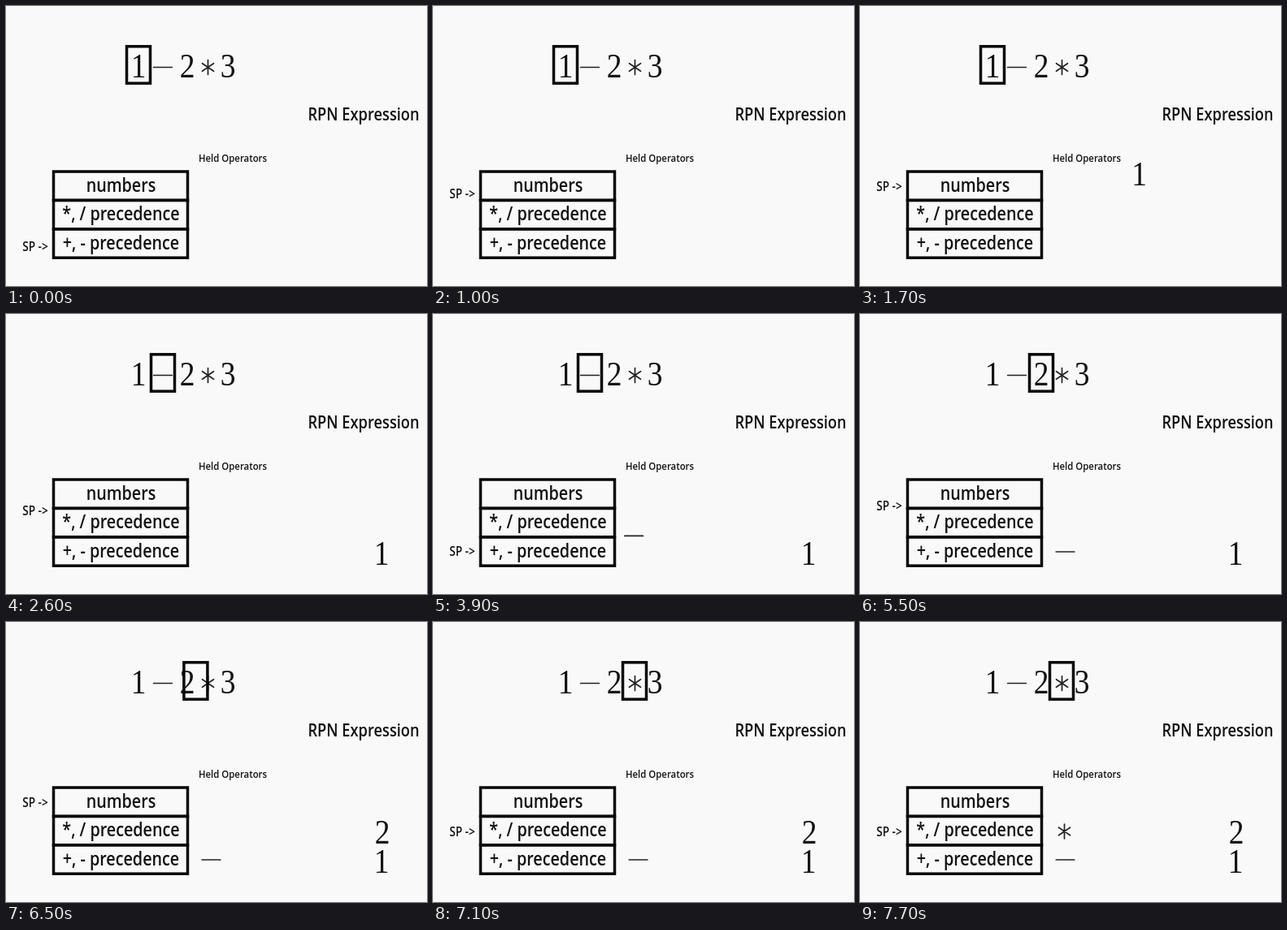
Recreate the animation shown at these times as an HTML page. Size 518 px wide and 345 px high, loop 8 s.

```html
<!DOCTYPE html>
<html lang="en">
<head>
<meta charset="utf-8">
<title>Expression to RPN</title>
<style>
  html, body { margin: 0; width: 100%; height: 100%; overflow: hidden; background: #f9f9f9; }
  svg { display: block; width: 518px; height: 345px; }
  text { font-family: "Open Sans", "Noto Sans", sans-serif; font-weight: 600; text-anchor: middle; fill: #111; }
  .digit { font-family: "Liberation Serif", serif; font-weight: 400; font-size: 43px; }
  .frame { fill: none; stroke: #080808; stroke-width: 3.5; }
  .sign { fill: none; stroke: #222; stroke-width: 1.7; stroke-linecap: round; }
</style>
</head>
<body>
<svg id="stage" viewBox="0 0 518 345"></svg>
<script>
const LOOP = 8000;
const SQUEEZE = 0.87; // the whole scene is narrower than its natural aspect
const stage = document.getElementById('stage');

function add(parent, tag, attrs, content = '') {
  const node = document.createElementNS('http://www.w3.org/2000/svg', tag);
  for (const key in attrs) node.setAttribute(key, attrs[key]);
  node.textContent = content;
  return parent.appendChild(node);
}

const place = (node, x, y) => node.setAttribute('transform', `translate(${x} ${y})`);

function group(x, y) {
  const node = add(stage, 'g', {});
  place(node, x, y);
  return node;
}

function label(content, x, y, size) {
  const node = group(x, y);
  add(node, 'text', { transform: `scale(${SQUEEZE} 1)`, 'font-size': size }, content);
  return node;
}

function digit(content, x, y) {
  const node = group(x, y);
  add(node, 'text', { class: 'digit', transform: `scale(${SQUEEZE} 1)`, y: 14.5 }, content);
  return node;
}

function minus(x, y) {
  const node = group(x, y);
  add(node, 'path', { class: 'sign', d: 'M-11.3 0H11.3' });
  return node;
}

function star(x, y) {
  const node = group(x, y);
  add(node, 'path', { class: 'sign', 'stroke-width': 2, d: 'M0 -9V9M-7 -4.8L7 4.8M-7 4.8L7 -4.8' });
  return node;
}

// Static scene
label('RPN Expression', 440, 140.5, 21);
label('Held Operators', 279, 191.5, 13.1);
['numbers', '*, / precedence', '+, - precedence'].forEach((name, row) => {
  const top = 204 + row * 35.4;
  add(stage, 'rect', { class: 'frame', x: 58.5, y: top, width: 165, height: 35.4 });
  label(name, 141.5, top + 25, 22.7);
});
digit('1', 163, 73.5);
minus(193, 75.5);
digit('2', 223, 73.5);
star(248.5, 75.5);
digit('3', 273, 73.5);

// Moving parts
const pointer = label('SP ->', 36, 302, 15.6);
const cursor = group(163, 72.5);
add(cursor, 'rect', { class: 'frame', x: -14.5, y: -22.7, width: 29, height: 45.4 });

const STEP = 280, SHIFT = 300, COPY = 360;
const NUMBERS = [36, 228], TIMES = [36, 264], PLUS = [36, 298];

// Each move: [middle time, duration, destination]
const parts = [
  { node: pointer, from: [36, 302], moves: [
    [250, STEP, TIMES], [970, STEP, NUMBERS], [2594, STEP, TIMES], [3200, STEP, PLUS],
    [4870, STEP, TIMES], [5487, STEP, NUMBERS], [6990, STEP, TIMES]] },
  { node: cursor, from: [163, 72.5], moves: [
    [2150, SHIFT, [193, 72.5]], [4290, SHIFT, [223, 72.5]], [6511, SHIFT, [248, 72.5]]] },
  { node: digit('1', 163, 73.5), copy: true, from: [163, 73.5], moves: [[1686, COPY, [462, 294]]] },
  { node: minus(193, 75.5), copy: true, from: [193, 75.5], moves: [[3820, COPY, [252.5, 293]]] },
  { node: digit('2', 223, 73.5), copy: true, from: [223, 73.5], moves: [[6050, COPY, [463, 258]]] },
  { node: star(248.5, 75.5), copy: true, from: [248.5, 75.5], moves: [[7500, COPY, [251.5, 258]]] },
];

const sigmoid = x => 1 / (1 + Math.exp(-x));

function smooth(p) {
  if (p <= 0) return 0;
  if (p >= 1) return 1;
  const edge = sigmoid(-5);
  return (sigmoid(10 * p - 5) - edge) / (1 - 2 * edge);
}

function draw(time) {
  for (const { node, copy, from, moves } of parts) {
    let [x, y] = from;
    let started = !copy;
    for (const [middle, duration, [toX, toY]] of moves) {
      const k = smooth((time - middle) / duration + 0.5);
      x += (toX - x) * k;
      y += (toY - y) * k;
      started ||= k > 0;
    }
    place(node, x.toFixed(2), y.toFixed(2));
    node.setAttribute('visibility', started ? 'visible' : 'hidden');
  }
}

const start = performance.now();
function tick() {
  draw((performance.now() - start) % LOOP);
  requestAnimationFrame(tick);
}
draw(0);
requestAnimationFrame(tick);
</script>
</body>
</html>
```
